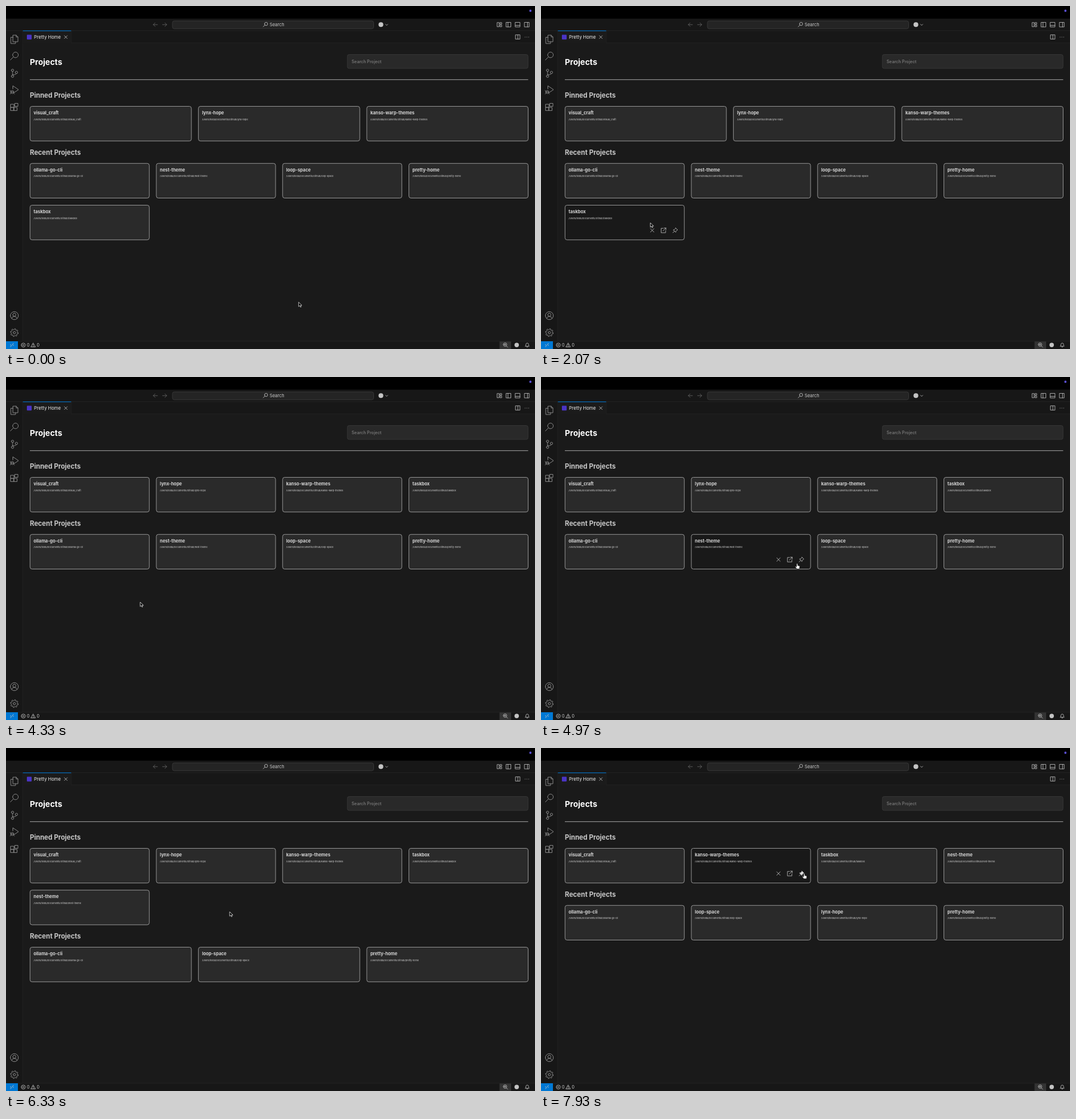
An HTML page that plays this animation: 887 by 576 pixels, repeating every 8 s.

```html
<!DOCTYPE html>
<html lang="en">
<head>
<meta charset="utf-8">
<title>Projects</title>
<style>
html, body { margin: 0; width: 100%; height: 100%; overflow: hidden; background: #1a1a1a; }
svg { display: block; width: 100vw; height: 100vh; }
text { font-family: Inter, Roboto, sans-serif; font-size: 7.5px; fill: #ccc; dominant-baseline: central; white-space: pre; }
.h1 { font-size: 13.5px; font-weight: 700; fill: #fff; }
.h2 { font-size: 11.15px; font-weight: 700; fill: #c8c8c8; }
.name { font-size: 7.4px; font-weight: 700; fill: #d4d4d4; }
.path { font-size: 3.78px; font-weight: 500; fill: #bdbdbd; }
.icon { fill: none; stroke: #c4c4c4; stroke-width: .8; stroke-linejoin: round; stroke-linecap: round; }
.side { stroke: #858585; stroke-width: 1; }
.dim { stroke: #686868; }
</style>
</head>
<body>
<svg viewBox="0 0 887 576" preserveAspectRatio="none">
  <rect width="887" height="576" fill="#1a1a1a"/>
  <rect width="887" height="21.5" fill="#000"/>
  <circle cx="879.3" cy="8" r="1.9" fill="#5a4fd2"/>
  <rect y="21.5" width="887" height="20" fill="#171717"/>
  <rect y="41.5" width="28" height="521.5" fill="#171717"/>
  <rect x="28" y="41.5" width="859" height="20.5" fill="#171717"/>
  <rect y="563" width="887" height="13" fill="#171717"/>
  <path d="M0 41.5H887M28 41.5V563M109.3 62H887M109.3 41.5V62M0 563H887" stroke="#282828" stroke-width=".7"/>
  <rect x="28.3" y="41.5" width="81" height="21" fill="#1b1b1b"/>
  <rect x="28.3" y="41.2" width="81" height="1" fill="#0078d4"/>
  <rect x="279" y="25" width="337.5" height="13.2" rx="3.3" fill="#242424" stroke="#3d3d3d" stroke-width=".8"/>
  <text x="442" y="31.4" style="font-size:7.4px">Search</text>
  <rect x="35" y="48.3" width="8" height="8" rx="1" fill="#4a34c4"/>
  <text x="47" y="52.3" style="font-size:7.6px;fill:#f0f0f0">Pretty Home</text>
  <circle cx="628.6" cy="31.3" r="4" fill="#c4c4c4"/>
  <rect y="563" width="20" height="13" fill="#0078d4"/>
  <rect x="827.5" y="563.3" width="19.5" height="12.7" fill="#333"/>
  <circle cx="856.3" cy="569.3" r="3.7" fill="#c4c4c4"/>
  <text x="35" y="569.4" style="font-size:7.2px">0</text>
  <text x="51.5" y="569.4" style="font-size:7.2px">0</text>
  <g id="icons"></g>
  <text class="h1" x="40" y="93.6">Projects</text>
  <rect x="572.3" y="81.5" width="303" height="23.3" rx="3" fill="#292929" stroke="#3c3c3c" stroke-width=".8"/>
  <text x="579.5" y="93.2" style="font-size:7.1px;font-weight:600;fill:#757575">Search Project</text>
  <path d="M40 123.7H875.5" stroke="#b4b4b4" stroke-width=".9"/>
  <g id="board"></g>
  <circle id="ring" r="14.4" fill="#fff" fill-opacity=".15" stroke="#8c8c8c" stroke-width="1.2"/>
  <path id="arrow" d="M0 0V7.4L1.8 5.8 3 8.4 4.2 7.9 3.1 5.4H5.4Z" fill="#000" stroke="#fff" stroke-width=".7"/>
  <path id="hand" d="M-.8 .6Q0-.5.8 .6V3.2Q1.6 2.5 2.1 3.4 2.9 2.8 3.3 3.8 4.4 3.4 4.4 4.8 4.5 7-.0 0" fill="none"/>
</svg>
<script>
const LOOP = 8000;
const $ = id => document.getElementById(id);

const icon = (x, y, d, cls = '') =>
  `<path class="icon ${cls}" transform="translate(${x} ${y})" d="${d}"/>`;
const disc = (r, x = 0, y = 0) => `M${x - r} ${y}a${r} ${r} 0 1 1 ${2 * r} 0a${r} ${r} 0 1 1 ${-2 * r} 0`;
const box = (x, y, w, h) => `M${x} ${y}h${w}v${h}h${-w}z`;
const cross = r => `M${-r} ${-r}L${r} ${r}M${r} ${-r}L${-r} ${r}`;
const lens = r => disc(r, r * .4, -r * .4) + `M${-r * .3} ${r * .3}L${-r * 1.4} ${r * 1.4}`;
const frame = box(-3.8, -3.8, 7.6, 7.6);

const gear = () => {
  let d = '';
  for (let i = 0; i < 32; i++) {
    const a = (i + .5) * Math.PI / 16, r = i % 4 < 2 ? 6.6 : 4.9;
    d += `${i ? 'L' : 'M'}${(r * Math.cos(a)).toFixed(2)} ${(r * Math.sin(a)).toFixed(2)}`;
  }
  return d + 'z' + disc(2);
};

$('icons').innerHTML = [
  icon(14, 56, 'M-2-7H3L6-4V4H-2zM3-7V-4H6M-2-3.5H-6V7H2V4', 'side'),
  icon(14, 84, lens(4.7), 'side'),
  icon(14, 113, disc(2, -3, -5) + disc(2, 3.5, -1.5) + disc(2, -3, 5) + 'M-3-3V3M3.5 .5Q3 2.5-3 2.5', 'side'),
  icon(14, 141, 'M-2.5-2V-7L7-.5-.5 4.5' + disc(2.5, -3.5, 3.5) + 'M-6 3.5H-1M-7 1L-5.7 2M-7 6.5L-5.5 5.5M0 6.5L-1.5 5.5', 'side'),
  icon(14, 170, box(-6, -5, 5.3, 5.3) + box(-6, .3, 5.3, 5.3) + box(-.7, .3, 5.3, 5.3) + box(1, -6.5, 5, 5), 'side'),
  icon(14, 520, disc(6.7) + disc(2.6, 0, -1.5) + 'M-4.6 4.8Q-4 1.3 0 1.3T4.6 4.8', 'side'),
  icon(14, 548.5, gear(), 'side'),
  icon(250.5, 31.3, 'M3.5 0H-3.5M-.5-3L-3.5 0-.5 3', 'dim'),
  icon(266, 31.3, 'M-3.5 0H3.5M.5-3L3.5 0 .5 3', 'dim'),
  icon(435, 31.2, lens(2.7)),
  icon(638.3, 31.6, 'M-1.8-.9L0 .9 1.8-.9'),
  icon(827.5, 31.3, box(-3.7, -3.5, 3, 7) + box(1, -3.5, 2.7, 2.7) + box(1, .8, 2.7, 2.7)),
  icon(842.7, 31.3, frame + 'M-1-3.8V3.8'),
  icon(858, 31.3, frame + 'M-3.8 1.3H3.8'),
  icon(873.4, 31.3, frame + 'M1-3.8V3.8'),
  icon(858.2, 52, box(-3.6, -3.6, 7.2, 7.2) + 'M0-3.6V3.6'),
  icon(873.3, 52.2, 'M-3 0h.1M0 0h.1M3 0h.1'),
  icon(100.3, 52.2, cross(2.4)),
  icon(10, 569.4, 'M-2.7-.8L-.5 1-2.7 2.8M2.7-2.8L.5-1 2.7 .8'),
  icon(29, 569.4, disc(3.4) + cross(1.3)),
  icon(45.7, 569.3, 'M0-3.2L3.6 3.2H-3.6zM0-1V1M0 2.1V2.2'),
  icon(837.2, 569, 'M2 2L4 4' + disc(2.9, -.4, -.4) + 'M-1.7-.4H.9M-.4-1.7V.9'),
  icon(874, 569.3, 'M-3.2 2H3.2L2.3 .5V-1Q2-3.3 0-3.3T-2.3-1V.5zM-.8 3.3H.8')
].join('');

$('hand').setAttribute('d', 'M-.9 .7Q0-.6.9 .7V3.3L3.6 4Q4.5 4.3 4.4 5.3L3.8 8.8H-.6L-3 5.6Q-3 4.3-1.9 4.8L-.9 5.6Z');
$('hand').setAttribute('style', 'fill:#fff;stroke:#111;stroke-width:.6');

// Each stage: start time, pinned projects, recent projects.
const stages = [
  [0, 'visual_craft lynx-hope kanso-warp-themes', 'ollama-go-cli nest-theme loop-space pretty-home taskbox'],
  [3630, 'visual_craft lynx-hope kanso-warp-themes taskbox', 'ollama-go-cli nest-theme loop-space pretty-home'],
  [5570, 'visual_craft lynx-hope kanso-warp-themes taskbox nest-theme', 'ollama-go-cli loop-space pretty-home'],
  [7400, 'visual_craft kanso-warp-themes taskbox nest-theme', 'ollama-go-cli loop-space lynx-hope pretty-home']
].map(([start, pinned, recent]) => {
  const cards = [];
  const heads = [];
  let top = 168.5;
  [['Pinned Projects', pinned], ['Recent Projects', recent]].forEach(([title, list], group) => {
    const names = list.split(' ');
    const cols = Math.min(4, names.length);
    const w = (835.2 - 11.8 * (cols - 1)) / cols;
    heads.push([title, top - 18.3]);
    names.forEach((name, i) => cards.push({
      name, w, pinned: !group,
      x: 40.3 + (i % cols) * (w + 11.8),
      y: top + Math.floor(i / cols) * 70.2
    }));
    top += Math.ceil(names.length / cols) * 70.2 + 25.6;
  });
  return { start, cards, heads };
});

const CARD_H = 58.2;
const PIN = 'M.8-4L4-.8 2.9-.3 1.2 1.6 .8 3.3-3.3-.8-1.6-1.2 .3-2.9zM-1.3 1.3L-4 4';
const actions = c => {
  const right = c.x + c.w, y = c.y + 42.3;
  return icon(right - 53.8, y, cross(2.9)) +
    icon(right - 34.8, y, 'M-.5-3.5H-4V4H3.5V.5M1-4H4V-1M4-4L-1 1') +
    `<g style="fill:${c.pinned ? '#ddd' : 'none'}">` +
    icon(right - 15.2, y, PIN).replace('<path', `<path style="fill:${c.pinned ? '#ddd' : 'none'}"`) + '</g>';
};
const drawCard = (c, hover) =>
  `<rect x="${c.x}" y="${c.y}" width="${c.w}" height="${CARD_H}" rx="3.4" fill="${hover ? '#191919' : '#2a2a2a'}" stroke="#a0a0a0" stroke-width=".9"/>
   <text class="name" x="${c.x + 6}" y="${c.y + 10.8}">${c.name}</text>
   <text class="path" x="${c.x + 6}" y="${c.y + 21.5}">/Users/teldu/Documents/Github/${c.name}</text>` +
  (hover ? actions(c) : '');

const moves = [
  [0, 490.7, 497.3], [600, 490.7, 497.3], [1070, 280.5, 390], [1830, 280.5, 390],
  [2070, 183.3, 364], [2770, 183.3, 364], [3230, 223.3, 377], [3330, 225, 378],
  [4330, 225, 378], [4500, 404, 318], [4630, 413, 328], [4870, 413, 328],
  [4970, 429.5, 313.3], [5330, 436, 307], [6130, 436, 307], [6330, 375, 275],
  [6930, 441, 212], [6970, 441, 212], [7100, 436.2, 211.8], [7830, 436.2, 211.8],
  [7930, 441.3, 210.8], [LOOP, 441.3, 210.8]
];
const clicks = [[3600, 3630], [5530, 5570], [7370, 7400]];
const HOVER_PAUSE = [7400, 7530];
const within = (t, [a, b]) => t >= a && t < b;

function cursorAt(t) {
  const i = moves.findIndex(m => m[0] > t);
  const [t0, x0, y0] = moves[i - 1], [t1, x1, y1] = moves[i];
  const k = (t - t0) / (t1 - t0), e = k * k * (3 - 2 * k);
  return [x0 + (x1 - x0) * e, y0 + (y1 - y0) * e];
}

let shown = '';
function render(t) {
  const [x, y] = cursorAt(t);
  const index = stages.filter(s => s.start <= t).length - 1;
  const { cards, heads } = stages[index];
  const over = cards.find(c => x > c.x && x < c.x + c.w && y > c.y && y < c.y + CARD_H);
  const lit = within(t, HOVER_PAUSE) ? null : over;
  const onButton = over && Math.abs(y - over.y - 42.3) < 9 &&
    [53.8, 34.8, 15.2].some(d => Math.abs(x - over.x - over.w + d) < 9);

  const key = index + (lit ? lit.name : '');
  if (key !== shown) {
    shown = key;
    $('board').innerHTML =
      heads.map(([title, hy]) => `<text class="h2" x="40" y="${hy}">${title}</text>`).join('') +
      cards.map(c => drawCard(c, c === lit)).join('');
  }
  for (const id of ['arrow', 'hand', 'ring']) $(id).setAttribute('transform', `translate(${x} ${y})`);
  $('arrow').style.display = onButton ? 'none' : '';
  $('hand').style.display = onButton ? '' : 'none';
  $('ring').style.display = clicks.some(c => within(t, c)) ? '' : 'none';
}

const begin = performance.now();
function tick() {
  render((performance.now() - begin) % LOOP);
  requestAnimationFrame(tick);
}
tick();
</script>
</body>
</html>
```
